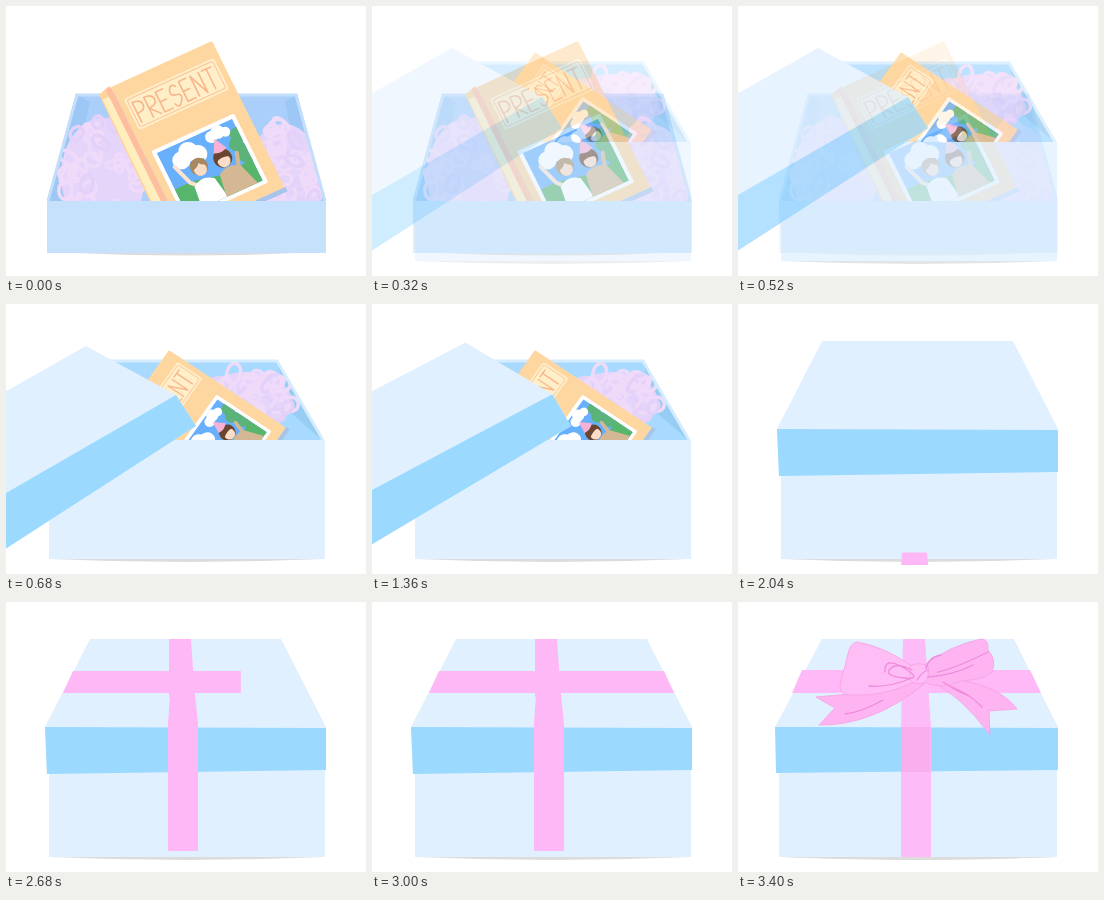
An HTML page for the animation above (5000 ms loop, 360x270 px).

```html
<!DOCTYPE html>
<html lang="en">
<head>
<meta charset="utf-8">
<title>Gift box</title>
<style>
html, body { margin: 0; width: 100%; height: 100%; overflow: hidden; background: #fff }
svg { display: block }
</style>
</head>
<body>
<svg width="320" height="261" overflow="hidden">
  <defs>
    <clipPath id="photoClip"><path d="M-97 79h83v69h-83z"/></clipPath>
    <clipPath id="insideA"><path d="M72 88H289L318 196H43z"/></clipPath>
    <clipPath id="insideB"><path d="M92 57H271L316 137H45z"/></clipPath>
    <clipPath id="aboveFront"><path d="M0 0H320V196H0z"/></clipPath>

    <!-- Origin is the top right corner of the cover -->
    <g id="book">
      <path d="M-122 163H1V168H-122z" fill="#a9c4ea"/>
      <path d="M-125 2L-112 -2V180H-128z" fill="#ffd49a"/>
      <path d="M-124 8h8v172h-10z" fill="#ffefbf"/>
      <path d="M-117 0h6v180h-6z" fill="#fdbd9f"/>
      <rect x="-111" width="111" height="163" rx="2" fill="#fed6a0"/>
      <rect x="-105" y="16" width="99" height="35" rx="3" fill="#ffefc8"/>
      <rect x="-102.500" y="18.500" width="94" height="30" rx="2" fill="none" stroke="#fbc19a"/>
      <g id="title" fill="none" stroke="#f9b58c" stroke-width="1.600" stroke-linecap="round" stroke-linejoin="round"/>
      <g transform="translate(-2.500 0)">
        <rect x="-101" y="75" width="91" height="77" rx="2" fill="#fff"/>
        <g clip-path="url(#photoClip)">
          <path d="M-97 79h83v69h-83z" fill="#68b0fb"/>
          <g fill="#fff">
            <circle cx="-78" cy="96" r="9"/><circle cx="-68" cy="91" r="10"/><circle cx="-60" cy="97" r="9"/>
            <circle cx="-41" cy="87" r="6"/><circle cx="-33" cy="85" r="7"/><circle cx="-26" cy="88" r="5"/>
          </g>
          <path d="M-97 120q20-2 40 4t43-2v40h-83z" fill="#58b56c"/>
          <g fill="#5cb37a">
            <circle cx="-16" cy="96" r="8"/><circle cx="-22" cy="104" r="7"/><circle cx="-16" cy="116" r="10"/>
          </g>
          <path d="M-87 99l7 21 8 8" fill="none" stroke="#fbe3d0" stroke-width="4" stroke-linecap="round"/>
          <path d="M-81 150l3-24q10-9 22 0l4 24z" fill="#fff"/>
          <path d="M-54 150l4-25q11-8 23 0l8 25z" fill="#d4b894"/>
          <path d="M-30 127l5-15" stroke="#d4b894" stroke-width="4" stroke-linecap="round"/>
          <circle cx="-65" cy="109" r="9" fill="#a88860"/>
          <circle cx="-65" cy="112" r="6.500" fill="#fbdcc6"/>
          <path d="M-72 110q6-1 8-5 2 4 7 5v-7h-15z" fill="#a88860"/>
          <circle cx="-40" cy="111" r="9.500" fill="#6b452f"/>
          <circle cx="-40" cy="114" r="6.500" fill="#fbdcc6"/>
          <path d="M-47 112q7-3 14 0v-7h-14z" fill="#6b452f"/>
          <path d="M-39 90l7 13q-7 4-14 0z" fill="#f7b1d4"/>
        </g>
      </g>
    </g>
  </defs>

  <g id="open">
    <path d="M44 246H317Q180 253 44 246z" fill="#dcdcdc"/>
    <path d="M70 88H291L320 196H41z" fill="#a9cffa"/>
    <path d="M70 88L84 96 62 196H41zM291 88L279 96 300 196H320z" fill="#9dc7f4"/>
    <g id="curlsA" clip-path="url(#insideA)" fill="none" stroke-width="3.500"/>
    <path d="M42 195L71 89H290L319 195" fill="none" stroke="#c3defb" stroke-width="3"/>
    <g clip-path="url(#aboveFront)">
      <use href="#book" transform="translate(206 35) rotate(-24.500) skewX(1.900)"/>
    </g>
    <path d="M41 195H320V247H41z" fill="#c6e1fb"/>
  </g>

  <g id="tall">
    <path d="M0 0H320V261H0z" fill="#fff"/>
    <path d="M44 255H317Q180 261 44 255z" fill="#dcdcdc"/>
    <path d="M92 56H271L318 137H43z" fill="#a8daff"/>
    <path d="M271 57L284 108 316 136z" fill="#98cdf3"/>
    <g id="curlsB" clip-path="url(#insideB)" fill="none" stroke-width="3.500"/>
    <path d="M44 136L92 57H271L317 136" fill="none" stroke="#d5ecff" stroke-width="3"/>
    <use href="#book" transform="translate(163 46) rotate(-54.500) scale(.86) skewX(1.900)"/>
    <path d="M43 136H319V255H43z" fill="#e0f0ff"/>
    <polygon id="lidTop" fill="#e0f0ff"/>
    <polygon id="lidFront" fill="#9cd9ff"/>
    <g fill="#ffb8f6">
      <polygon id="across"/>
      <polygon id="over"/>
      <path id="front" d="M164 92H189L192 122V249H162V122z"/>
    </g>
  </g>

  <g id="wrapped">
    <path d="M44 255H317Q180 261 44 255z" fill="#dcdcdc"/>
    <path d="M41 165H319V255H41z" fill="#e0f0ff"/>
    <path d="M84 37H276L320 126 37 125z" fill="#e0f0ff"/>
    <path d="M37 125L320 126V168L38 171z" fill="#9cd9ff"/>
    <path d="M64 68H292L303 91H54z" fill="#ffb9f6"/>
    <path d="M165 37H187L193 125V255H163V125z" fill="#fdbbf8"/>
    <path d="M163 125H192V170H163z" fill="#f9aeee"/>
    <g fill="#fdb4f0" stroke="#f7a0e4" stroke-width=".8" stroke-linejoin="round">
      <path d="M172 76Q130 92 78 95L97 106 81 123Q135 124 186 82z"/>
      <path d="M190 78Q222 92 252 133L251 109 279 107Q262 84 220 78z"/>
      <path d="M174 64Q145 44 119 40Q112 41 110 52L102 83Q101 93 112 93Q146 95 176 80z" fill="#ffbdf5"/>
      <path d="M184 65Q210 44 243 37Q251 37 250 48Q259 58 254 70Q246 78 222 79Q202 89 184 79z"/>
      <path d="M172 64Q182 59 190 65Q192 76 186 81Q177 83 172 78z" fill="#ffbdf5"/>
    </g>
    <g fill="none" stroke="#ef8bdc" stroke-width="1.300" stroke-linecap="round">
      <path d="M174 68Q158 60 152 67T166 76T166 66T147 70"/>
      <path d="M174 76Q150 86 131 84"/>
      <path d="M188 67Q190 55 203 53M190 75Q216 73 235 63M200 70Q218 66 250 50"/>
      <path d="M179 78Q184 70 190 68M145 98Q124 110 107 112M214 85Q232 92 244 105M205 80Q220 90 231 94"/>
    </g>
  </g>
</svg>
<script>
const $ = id => document.getElementById(id);
const clamp = v => Math.min(1, Math.max(0, v));
const span = (t, from, to) => clamp((t - from) / (to - from));
const lerp = (a, b, p) => a + (b - a) * p;

// Hand lettering: one stroke path for each letter
const glyphs = {
  P: 'M0 22V0q9 0 9 6t-9 6',
  R: 'M0 22V0q9 0 9 6t-9 6l9 10',
  E: 'M8 0H0V22H9M0 11H7',
  S: 'M8 3Q4-2 1 4T5 11T7 19T0 19',
  N: 'M0 22V0L9 22V0',
  T: 'M0 0H10M5 0V22'
};
$('title').innerHTML = [...'PRESENT'].map((c, i) =>
  `<path transform="translate(${-99 + i * 12.7} 23)" d="${glyphs[c]}"/>`).join('');

// Shredded paper: overlapping loops scattered in an ellipse
let seed = 7;
const rand = () => (seed = seed * 16807 % 2147483647) / 2147483647;
function curls(id, cx, cy, rx, ry) {
  let out = `<ellipse cx="${cx}" cy="${cy}" rx="${rx}" ry="${ry}" fill="#e6d5fb"/>`;
  for (let i = 0; i < 42; i++) {
    const a = rand() * 2 * Math.PI, d = Math.sqrt(rand());
    const x = cx + Math.cos(a) * d * rx, y = cy + Math.sin(a) * d * ry;
    out += `<ellipse cx="${x}" cy="${y}" rx="${6 + rand() * 5}" ry="${4 + rand() * 4}"
      transform="rotate(${rand() * 180} ${x} ${y})" stroke="${i % 4 ? '#f0daf9' : '#e4d1f9'}"/>`;
  }
  $(id).innerHTML += out;
}
curls('curlsA', 97, 170, 42, 58);
curls('curlsA', 278, 174, 38, 56);
curls('curlsB', 240, 98, 46, 30);
curls('curlsB', 105, 110, 36, 26);

// Lid corners: back left, back right, front right, front left, lower right, lower left
const lidOff = [[-79, 132], [80, 42], [170, 91], [-73, 231], [190, 122], [-49, 276]];
const lidOn = [[84, 37], [275, 37], [320.5, 126], [39, 125], [320.5, 168], [41, 172]];

function draw(t) {
  $('tall').setAttribute('opacity', span(t, 0, 680));

  const p = span(t, 1320, 1920);
  const lift = 32 * Math.sin(Math.PI * p ** 1.3);
  const lid = lidOff.map(([x, y], i) =>
    [lerp(x, lidOn[i][0], p), lerp(y, lidOn[i][1], p) - lift]);
  const corners = (...ids) => ids.map(i => lid[i].join()).join(' ');
  // The top runs on under the front so that no seam shows
  $('lidTop').setAttribute('points', corners(0, 1, 2, 4, 5, 3));
  $('lidFront').setAttribute('points', corners(3, 2, 4, 5));

  $('front').setAttribute('transform', `translate(0 ${170 * (1 - span(t, 2000, 2520))})`);

  const y = lerp(95, 37, span(t, 2460, 2620));
  $('over').setAttribute('points', `163,95 163,${y} ${lerp(189, 185, (95 - y) / 58)},${y} 189,95`);

  const q = span(t, 2440, 3000);
  const x = lerp(57, 302, 1 - (1 - q) ** 2.3);
  $('across').setAttribute('points', q
    ? `${Math.min(x, 67)},69 57,91 ${x},91 ${Math.min(x, 292)},69` : '');
  $('over').setAttribute('visibility', t < 2460 ? 'hidden' : 'visible');

  $('wrapped').setAttribute('opacity', span(t, 3060, 3400));
}

const start = performance.now();
function tick() {
  draw((performance.now() - start) % 5000);
  requestAnimationFrame(tick);
}
tick();
</script>
</body>
</html>
```
